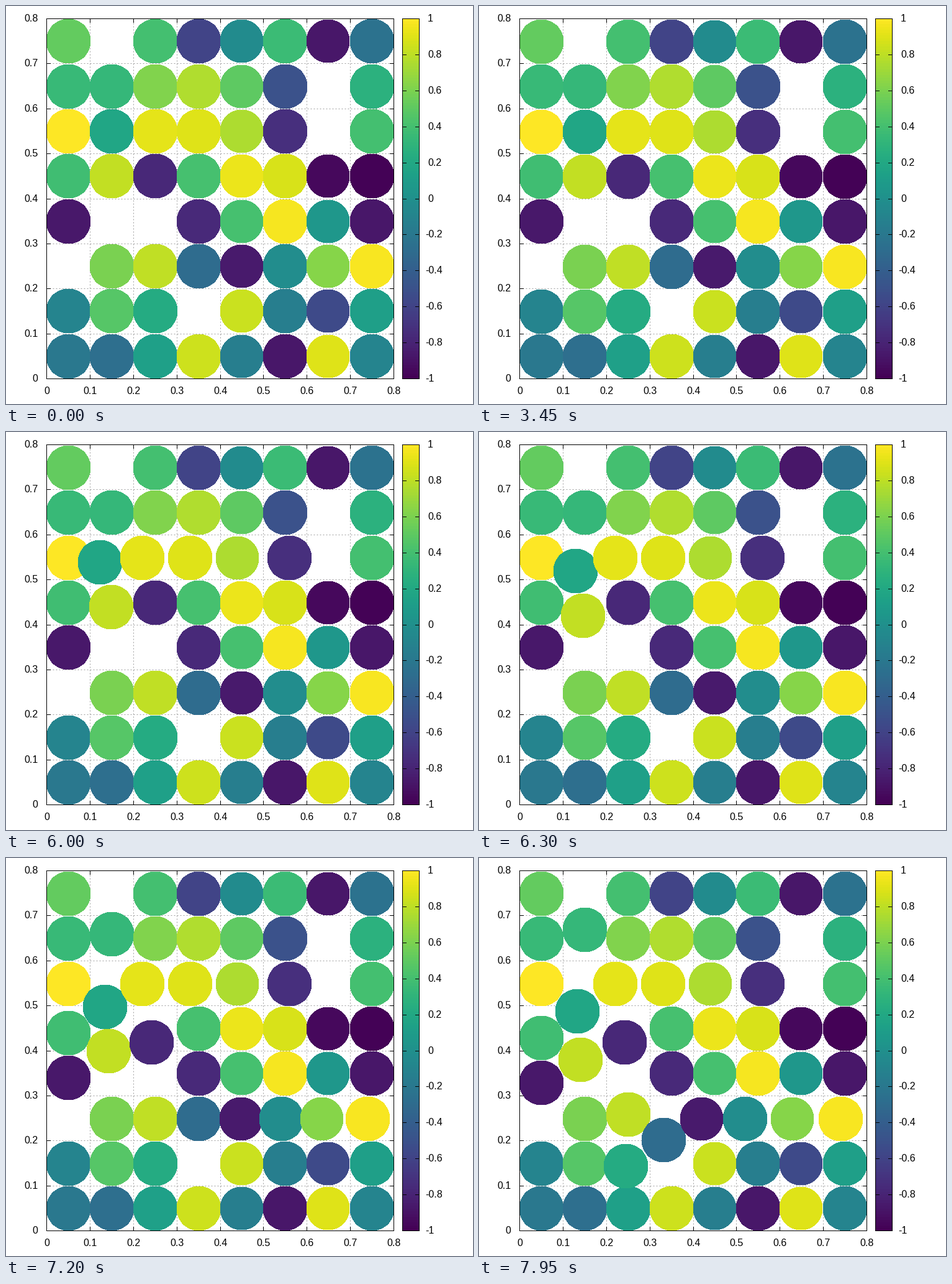
Animation, 752 px wide and 640 px high, one loop 8000 ms. Source, as a matplotlib script:

```python
from math import hypot

import numpy as np
import matplotlib.pyplot as plt
from matplotlib.animation import FuncAnimation
from matplotlib.patches import Circle, Rectangle

WIDTH, HEIGHT, DPI = 752, 640, 100
LEFT, RIGHT, TOP, BOTTOM = 65, 624, 20, 599
BAR_LEFT, BAR_RIGHT = 638, 665
CELLS = 8
CELL_W, CELL_H = (RIGHT - LEFT) / CELLS, (BOTTOM - TOP) / CELLS
INTERVAL, FRAMES, FRAMES_PER_STEP = 50, 160, 3
SPEED = 7.2  # pixels per step, shared by every moving disc
PX = 72 / DPI
NO = None

# Plotted data, top row first.
VALUES = [
    [.52, NO, .4, -.6, -.04, .36, -.88, -.25],
    [.35, .33, .62, .76, .5, -.5, NO, .28],
    [1, .18, .92, .9, .75, -.73, NO, .4],
    [.39, .82, -.78, .41, .94, .88, -.96, -.99],
    [-.87, NO, NO, -.77, .41, .97, .06, -.88],
    [NO, .6, .81, -.3, -.86, -.03, .64, .98],
    [-.1, .47, .22, NO, .84, -.15, -.55, .12],
    [-.2, -.28, .13, .85, -.15, -.88, .9, -.1],
]

# Knocks as (column, row, start step, dx, dy).
knocks = [
    (5, 2, 23, 7, 0),
    (1, 2, 39, 10, 37), (1, 3, 39, -5, 36), (2, 3, 42, -6, 22),
    (1, 1, 47, 0, -14), (0, 3, 47, 0, 15), (0, 4, 47, 0, 15),
    (3, 5, 48, -14, 36), (1, 3, 51, -2, 15), (2, 5, 52, 0, -8),
    (1, 2, 52, -1, 7), (2, 6, 52, -4, 4),
]


def push_row(row, first_col, start):
    """A push running left: each disc starts later and slides further."""
    for i in range(4):
        knocks.append((first_col - i, row, start + .6 * i, -7 * min(i + 1, 3), 0))


push_row(2, 4, 23)
push_row(5, 7, 46)


def to_pixel(value):
    return int(value + .5)


def radius(col):
    return 34 if col in (4, 6) else 35


def position(col, row, step):
    settle = .6 if step else 0
    x = to_pixel(LEFT + col * CELL_W) + radius(col)
    y = to_pixel(TOP + (row + .5) * CELL_H + settle)
    for c, r, start, dx, dy in knocks:
        if (c, r) == (col, row):
            done = np.clip((step - start) * SPEED / hypot(dx, dy), 0, 1)
            x, y = x + dx * done, y + dy * done
    return round(x) + .5, round(y) + .5


def line(x0, y0, x1, y1, **style):
    style = {"color": "black", "lw": PX, "zorder": 5, **style}
    ax.plot([x0 + .5, x1 + .5], [y0 + .5, y1 + .5], snap=False,
            solid_capstyle="projecting", **style)


def label(x, y, value, ha):
    ax.text(x, y, f"{value:g}", ha=ha, va="baseline", family="Liberation Sans",
            size=16 * PX, zorder=6)


def frame(x0, x1):
    ax.add_patch(Rectangle((x0 + .5, TOP + .5), x1 - x0, BOTTOM - TOP, fill=False,
                           ec="black", lw=PX, snap=False, zorder=5))


def draw_axes():
    dotted = dict(color="#a0a0a0", linestyle=(0, (2, 3)), zorder=1)
    for i in range(CELLS + 1):
        x = to_pixel(LEFT + i * CELL_W)
        y = to_pixel(BOTTOM - i * CELL_H)
        if 0 < i < CELLS:
            line(x, BOTTOM, x, TOP, **dotted)
            line(LEFT, y, RIGHT, y, **dotted)
        line(x, BOTTOM, x, BOTTOM - 6)
        line(x, TOP, x, TOP + 6)
        line(LEFT, y, LEFT + 6, y)
        line(RIGHT, y, RIGHT - 6, y)
        label(x + .5, 624, i / 10, "center")
        label(51.5, y + 5, i / 10, "right")
    frame(LEFT, RIGHT)


def draw_colorbar():
    ax.imshow(np.linspace(1, -1, 128)[:, None], cmap=cmap, vmin=-1, vmax=1,
              extent=(BAR_LEFT, BAR_RIGHT + 1, BOTTOM + 1, TOP),
              interpolation="nearest", aspect="auto", zorder=2)
    for i in range(11):
        y = to_pixel(BOTTOM - i * (BOTTOM - TOP) / 10)
        line(BAR_LEFT, y, BAR_LEFT + 6, y)
        line(BAR_RIGHT, y, BAR_RIGHT - 6, y)
        label(675 if i < 5 else 679, y + 5, (i - 5) / 5, "left")
    frame(BAR_LEFT, BAR_RIGHT)


fig = plt.figure(figsize=(WIDTH / DPI, HEIGHT / DPI), dpi=DPI, facecolor="white")
ax = fig.add_axes([0, 0, 1, 1])
cmap = plt.get_cmap("viridis")
draw_axes()
draw_colorbar()
ax.set(xlim=(0, WIDTH), ylim=(HEIGHT, 0))
ax.axis("off")

# Upper rows and right-hand columns lie on top.
discs = {}
for row in reversed(range(CELLS)):
    for col, value in enumerate(VALUES[row]):
        if value is not None:
            discs[col, row] = ax.add_patch(
                Circle((0, 0), radius(col) + .45, fc=cmap((value + 1) / 2),
                       lw=0, antialiased=False, zorder=3))


def update(index):
    step = index // FRAMES_PER_STEP
    for (col, row), disc in discs.items():
        disc.center = position(col, row, step)
    return list(discs.values())


animation = FuncAnimation(fig, update, frames=FRAMES, interval=INTERVAL,
                          init_func=lambda: update(0), repeat=True)
plt.show()
```
